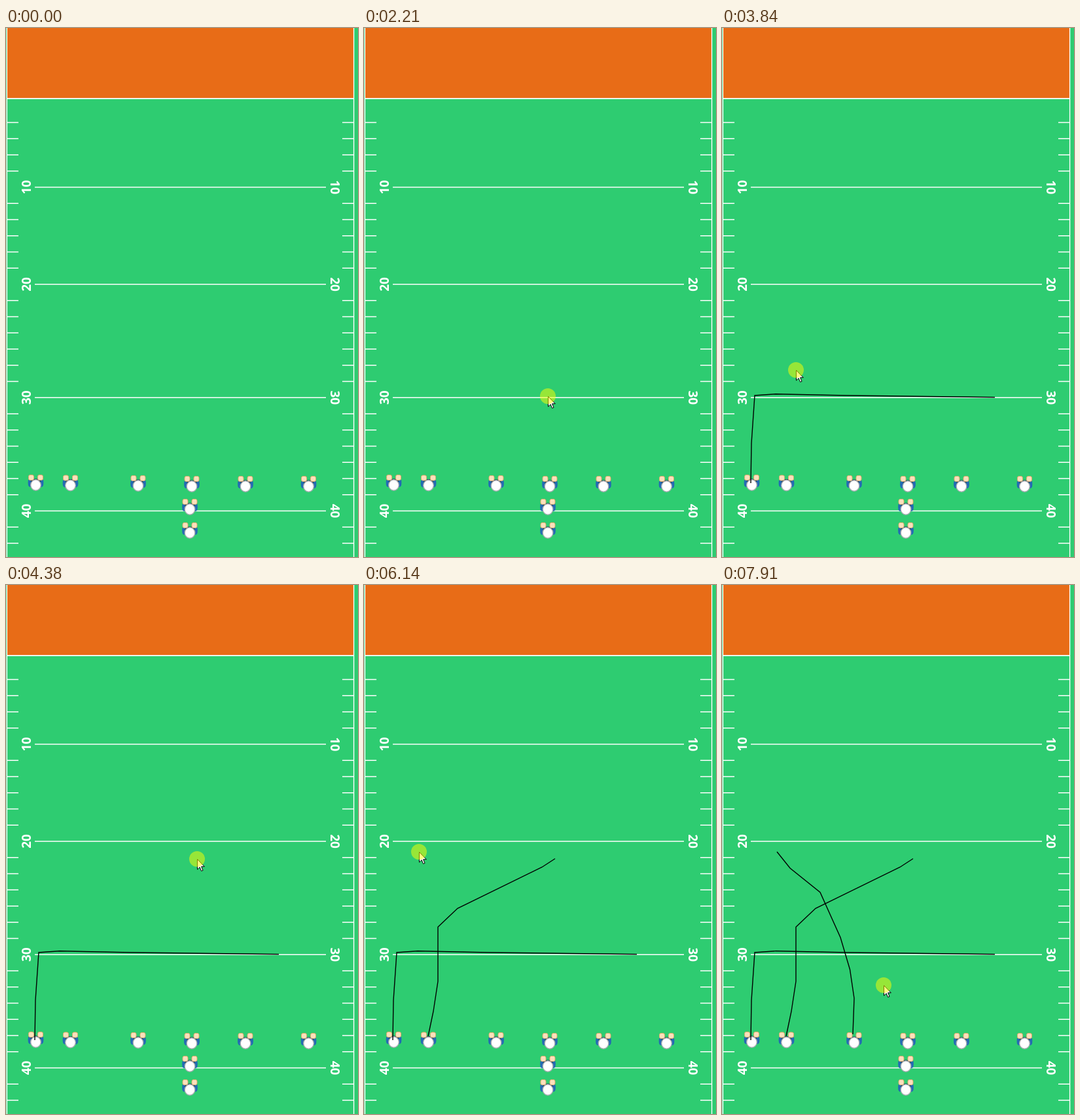
Animation of 538x809 px, one loop 7.99 s. Source, as an HTML page:

```html
<!DOCTYPE html>
<html lang="en">
<head>
<meta charset="utf-8">
<title>Play designer</title>
<style>
  html, body { margin: 0; width: 100%; height: 100%; overflow: hidden; background: #2ecc71; }
  svg { display: block; width: 100vw; height: 100vh; }
  text { font: bold 19px "Open Sans", sans-serif; fill: #fff; text-anchor: middle; }
  #marks { stroke: #fff; stroke-width: 1.4; }
  #routes { fill: none; stroke: #000; stroke-width: 1.4; }
</style>
</head>
<body>
<svg viewBox="0 0 538 809">
  <defs>
    <g id="player">
      <path d="M-11.5 -8Q-13 2 -9 3H9Q13 2 11.5 -8L6 -7H-6Z" fill="#236ab3"/>
      <ellipse cy="-5" rx="7.5" ry="4.5" fill="#102c4c"/>
      <g fill="#fde0bd" stroke="#e2a765" stroke-width=".9">
        <rect x="-11" y="-15.5" width="8" height="8" rx="2.5"/>
        <rect x="3" y="-15.5" width="8" height="8" rx="2.5"/>
      </g>
      <ellipse rx="7.8" ry="8.2" fill="#fff" stroke="#a8adb2" stroke-width="1.4"/>
    </g>
  </defs>
  <rect width="538" height="809" fill="#2ecc71"/>
  <rect x="2" width="529" height="107" fill="#e86c17"/>
  <g id="marks"></g>
  <g id="numbers"></g>
  <use href="#player" x="45.5" y="699"/>
  <use href="#player" x="98.5" y="699.5"/>
  <use href="#player" x="202" y="700"/>
  <use href="#player" x="284" y="701"/>
  <use href="#player" x="366" y="701"/>
  <use href="#player" x="462.5" y="701"/>
  <use href="#player" x="281" y="736"/>
  <use href="#player" x="281" y="772"/>
  <g id="routes"></g>
  <path id="cursor" d="M.5 .5V16L4.2 12.6L6.6 18.4L9 17.4L6.6 11.7H11.3Z" fill="#fff" stroke="#000"/>
  <circle id="press" r="12" fill="#ff0" fill-opacity=".5"/>
</svg>
<script>
const $ = id => document.getElementById(id);

// Field: evenly spaced ticks, full lines at the numbered rows
const numbered = { 4: 10, 10: 20, 17: 30, 24: 40 };
let marks = '<path d="M1.4 0V809M531.6 0V809"/><path d="M1 107.8H532" stroke-width="1.8"/>';
let numbers = '';
for (let i = 0; i <= 26; i++) {
  const y = 144.5 + 24.75 * i, label = numbered[i];
  marks += `<path d="${label ? `M44 ${y}H489` : `M2 ${y}H19M514 ${y}H531`}"/>`;
  if (label) numbers +=
    `<text transform="translate(37.5 ${y}) rotate(-90)">${label}</text>` +
    `<text transform="translate(495.5 ${y}) rotate(90)">${label}</text>`;
}
$('marks').innerHTML = marks;
$('numbers').innerHTML = numbers;

// Pointer path in [tick, x, y]: free moves alternate with drags
const enter = [[0, 392, 778], [5, 140, 694], [8, 20, 646], [10, 44, 696]];
const cross = [[12, 44, 696], [15, 45, 635], [19, 50, 562], [20, 50, 562],
               [22, 82, 559.7], [25, 190, 562], [30, 417, 564.7]];
const toSecond = [[31, 415, 566], [35, 240, 632], [38, 71, 688], [40, 97, 690]];
const post = [[42, 98, 690], [44, 106, 652], [46, 113, 606], [48, 113, 523],
              [50, 143, 494.5], [54, 272, 431.5], [55, 292, 418.5]];
const toThird = [[57, 292, 418], [63, 224, 628], [65, 203, 680], [67, 200, 691]];
const corner = [[67.8, 200, 687], [69, 202, 632], [69.5, 195.5, 588], [70.2, 181, 539],
                [72, 150, 470], [74, 104, 433], [78, 84, 408]];
const toFourth = [[79, 84, 408], [83, 210, 530], [88, 369, 680], [90, 368, 688]];
const slant = [[92, 368, 688], [94, 364, 650], [97, 335, 622], [101, 247, 612]];

const path = [enter, cross, toSecond, post, toThird, corner, toFourth, slant].flat();

// A drag's line appears on release, when the next move begins
const drags = [[cross, toSecond], [post, toThird], [corner, toFourth], [slant]]
  .map(([points, next]) => ({ points, press: Math.ceil(points[0][0]), release: next ? next[0][0] : Infinity }));
$('routes').innerHTML = drags
  .map(d => `<polyline points="${d.points.map(p => p.slice(1)).join(' ')}"/>`).join('');
const lines = [...$('routes').children];

function pointerAt(tick) {
  const next = path.findIndex(p => p[0] > tick);
  if (next < 1) return path.at(next < 0 ? -1 : 0).slice(1);
  const [t0, x0, y0] = path[next - 1], [t1, x1, y1] = path[next];
  const f = (tick - t0) / (t1 - t0);
  return [x0 + (x1 - x0) * f, y0 + (y1 - y0) * f].map(Math.round);
}

const LOOP = 7990, TICK = 77, ENTER = 131;
const show = (el, on) => el.setAttribute('visibility', on ? 'visible' : 'hidden');

function draw(now) {
  const tick = Math.floor((now % LOOP - ENTER) / TICK);
  const at = `translate(${pointerAt(tick).join(' ')})`;
  for (const id of ['cursor', 'press']) $(id).setAttribute('transform', at);
  show($('cursor'), tick >= 0);
  show($('press'), drags.some(d => tick >= d.press && tick < d.release));
  lines.forEach((line, i) => show(line, tick >= drags[i].release));
}

const start = performance.now();
(function frame() {
  draw(performance.now() - start);
  requestAnimationFrame(frame);
})();
</script>
</body>
</html>
```
